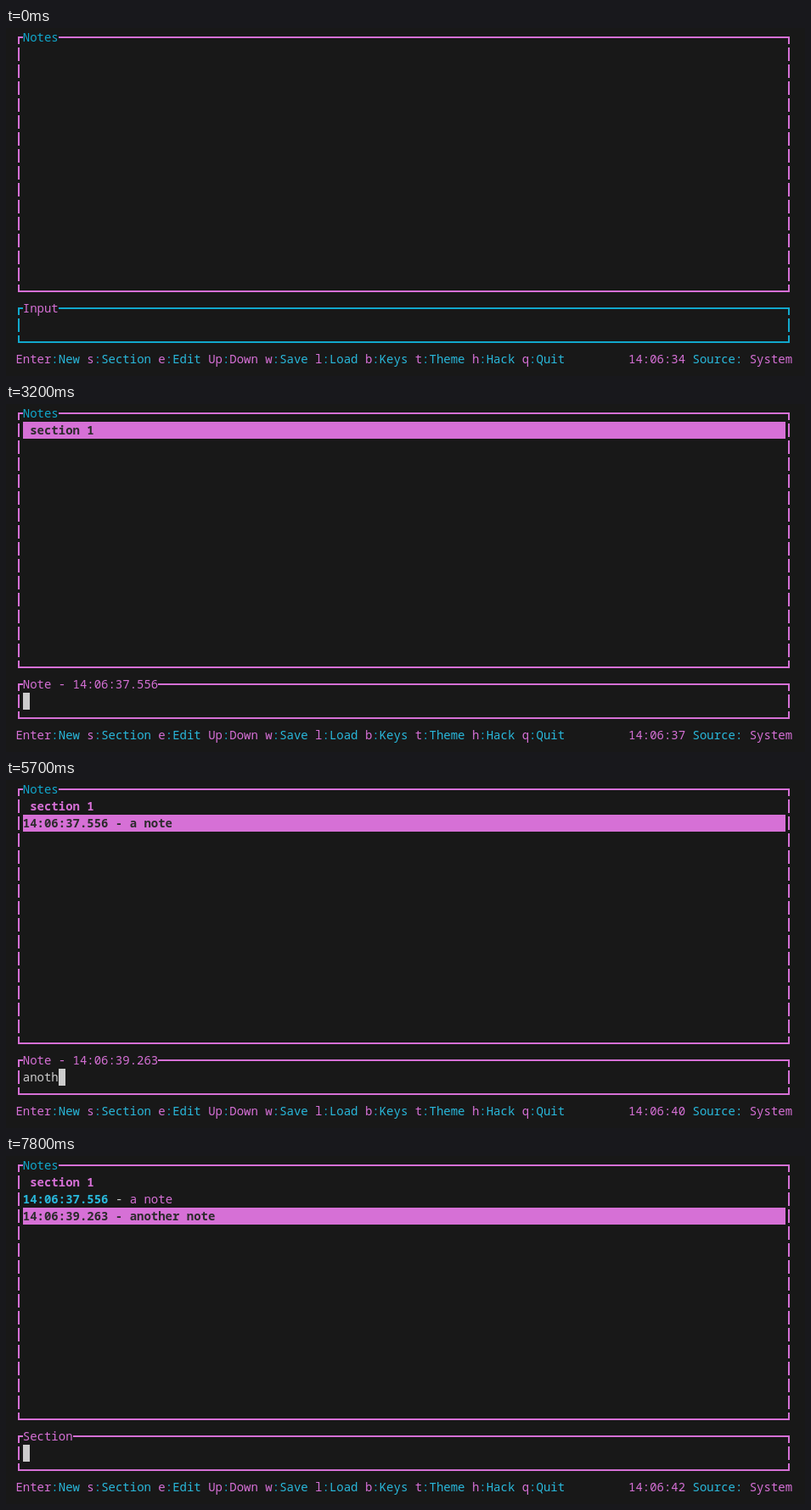
Animation of 941 by 411 pixels, one loop 8 s. Source, as an HTML page:

```html
<!DOCTYPE html>
<html lang="en">
<head>
<meta charset="utf-8">
<title>Notes terminal</title>
<style>
  html, body { margin: 0; width: 100%; height: 100%; overflow: hidden; background: #181818; }
  svg { position: absolute; left: 0; top: 0; }
  path { fill: none; stroke-width: 2; }
  #term {
    position: absolute; left: 0; top: 0;
    font: 14px/20px "Noto Sans Mono", monospace;
    font-variant-ligatures: none;
    color: #ccc;
  }
  .text { position: absolute; height: 20px; white-space: pre; }
  .m { color: #d670d6; stroke: #d670d6; }
  .c { color: #11a8cd; stroke: #11a8cd; }
  .b { color: #29b8db; }
  .bold { font-weight: 700; }
  .sel { color: #2b2b2b; font-weight: 700; }
  #bar, #cursor { position: absolute; display: none; height: 20px; }
  #bar { left: 20px; width: 898px; background: #d670d6; }
  #cursor { top: 341px; width: 8px; background: #ccc; }
</style>
</head>
<body>
<svg width="941" height="411">
  <path id="notesFrame" class="m"/>
  <path id="inputFrame"/>
</svg>
<div id="bar"></div>
<div id="cursor"></div>
<div id="term"></div>
<script>
const LEFT = 11.4, CELL = 8.391, LOOP = 8000;
const [term, bar, cursor, notesFrame, inputFrame] =
  ['term', 'bar', 'cursor', 'notesFrame', 'inputFrame'].map(id => document.getElementById(id));

const colX = col => LEFT + col * CELL;
const rowY = row => 1 + row * 20;
const span = (cls, text) => `<span class="${cls}">${text}</span>`;

function textAt(row, col) {
  const el = document.createElement('div');
  el.className = 'text';
  el.style.left = colX(col) + 'px';
  el.style.top = rowY(row) + 'px';
  return term.appendChild(el);
}

// Fit the font's own advance to the terminal grid.
function fitGrid() {
  const probe = textAt(0, 0);
  probe.textContent = '0'.repeat(100);
  term.style.letterSpacing = CELL - probe.getBoundingClientRect().width / 100 + 'px';
  probe.remove();
}

// Box outline with a gap for the title and a break between rows.
function framePath(first, last, title) {
  const l = 15, r = 922, top = rowY(first), bottom = rowY(last);
  let d = `M${l} ${top + 18}V${top + 10}H20M${Math.round(colX(1 + title.length))} ${top + 10}H${r}V${top + 18}`;
  for (let row = first + 1; row < last; row++)
    for (const x of [l, r]) d += `M${x} ${rowY(row) + 2}v16`;
  return d + `M${l} ${bottom + 2}V${bottom + 10}H${r}V${bottom + 2}`;
}

const stamps = ['14:06:37.556', '14:06:39.263'];
const notes = [
  { text: ' section 1', at: 2500 },
  { stamp: stamps[0], text: 'a note', at: 4400 },
  { stamp: stamps[1], text: 'another note', at: 7200 }
];

// Each prompt: open and close times, title, text and the time of each key.
const prompts = [
  { from: 300, to: 2500, title: 'Section', text: ' section 1',
    keys: [600, 800, 1000, 1200, 1400, 1500, 1700, 1800, 1900, 2100] },
  { from: 3200, to: 4400, title: 'Note - ' + stamps[0], text: 'a note',
    keys: [3500, 3600, 3800, 3900, 4000, 4200] },
  { from: 4900, to: 7200, title: 'Note - ' + stamps[1], text: 'another note',
    keys: [5200, 5300, 5500, 5600, 5700, 5800, 6000, 6100, 6200, 6300, 6600, 6800] },
  { from: 7800, to: LOOP, title: 'Section', text: '', keys: [] }
];
const ticks = [600, 1700, 2700, 3800, 4800, 5700, 6800, 7800];
const passed = (times, t) => times.filter(at => at <= t).length;

const commands = 'Enter:New s:Section e:Edit Up:Down w:Save l:Load b:Keys t:Theme h:Hack q:Quit';
const menu = commands.split(' ').map(item => {
  const [key, label] = item.split(':');
  return span('m', key) + span('c', ':') + span(key === 'Up' ? 'm' : 'b', label);
}).join(' ');

function noteHtml({ stamp, text }, selected) {
  if (selected) return span('sel', stamp ? stamp + ' - ' + text : text);
  if (!stamp) return span('m bold', text);
  return span('b bold', stamp) + ' - ' + span('m', text);
}

fitGrid();
textAt(0, 1).innerHTML = span('c', 'Notes');
textAt(19, 0).innerHTML = menu;
notesFrame.setAttribute('d', framePath(0, 15, 'Notes'));
const noteRows = notes.map((_, i) => textAt(i + 1, 1));
const titleText = textAt(16, 1);
const inputText = textAt(17, 1);
const clock = textAt(19, 86);
titleText.classList.add('m');

function drawNotes(count) {
  noteRows.forEach((row, i) => {
    row.innerHTML = i < count ? noteHtml(notes[i], i === count - 1) : '';
  });
  bar.style.display = count ? 'block' : 'none';
  bar.style.top = rowY(count) + 'px';
}

function drawInput(prompt, typed) {
  const title = prompt ? prompt.title : 'Input';
  titleText.textContent = title;
  inputText.textContent = prompt ? prompt.text.slice(0, typed) : '';
  inputFrame.setAttribute('class', prompt ? 'm' : 'c');
  inputFrame.setAttribute('d', framePath(16, 18, title));
  cursor.style.display = prompt ? 'block' : 'none';
  cursor.style.left = Math.round(colX(typed + 1)) + 'px';
}

function drawClock(seconds) {
  clock.innerHTML = span('m', '14:06:' + seconds) + ' ' + span('b', 'Source:') + ' ' + span('m', 'System');
}

let last = '';
function render(t) {
  const count = passed(notes.map(n => n.at), t);
  const prompt = prompts.find(p => p.from <= t && t < p.to);
  const typed = prompt ? passed(prompt.keys, t) : 0;
  const seconds = 34 + passed(ticks, t);
  const state = [count, prompt && prompt.from, typed, seconds].join();
  if (state === last) return;
  last = state;
  drawNotes(count);
  drawInput(prompt, typed);
  drawClock(seconds);
}

const start = performance.now();
function frame() {
  render((performance.now() - start) % LOOP);
  requestAnimationFrame(frame);
}
frame();
</script>
</body>
</html>
```
